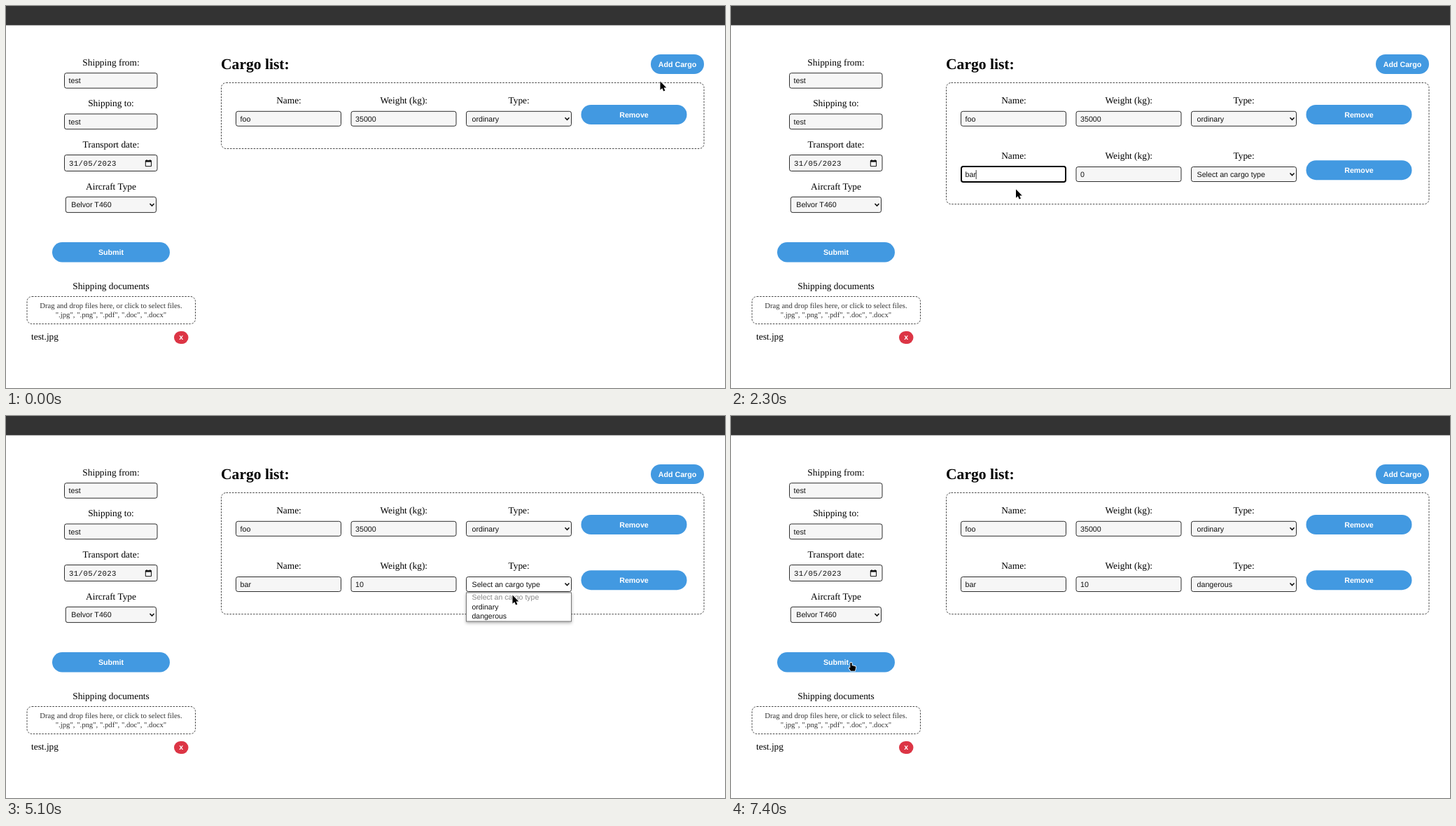
Recreate the animation shown at these times as an HTML page. Size 1027 px wide and 545 px high, loop 8000 ms.

```html
<!DOCTYPE html>
<html lang="en">
<head>
<meta charset="utf-8">
<title>Cargo form</title>
<style>
  html, body { margin: 0; width: 100%; height: 100%; overflow: hidden; background: #fff; }
  svg { display: block; width: 100%; height: 100%; }
  text {
    font: 10.69px "Liberation Sans", Arial, sans-serif; fill: #111;
    white-space: pre; text-rendering: geometricPrecision;
  }
  .label { font: 13.36px "Liberation Serif", Times, serif; fill: #000; text-anchor: middle; }
  .file { text-anchor: start; }
  .title { font: bold 21.6px "Liberation Serif", Times, serif; fill: #000; }
  .hint { font: 10.69px "Liberation Serif", Times, serif; fill: #333; text-anchor: middle; }
  .btn { font-weight: bold; fill: #fff; text-anchor: middle; }
  .date { font: 10.69px "Liberation Mono", monospace; letter-spacing: .35px; }
  .option { font-size: 10.5px; }
  .dashed { fill: none; stroke: #333; stroke-width: .9; stroke-dasharray: 2.5 1.7; }
</style>
</head>
<body>
<svg id="stage" viewBox="0 0 1027 545"></svg>
<script>
const LOOP = 8000, STEP = 100, ROW = 79.2;
const BLUE = '#4299e1', PICK = '#1e90ff';
const stage = document.getElementById('stage');

function add(parent, tag, attrs, content) {
  const node = document.createElementNS('http://www.w3.org/2000/svg', tag);
  for (const key in attrs) node.setAttribute(key, attrs[key]);
  if (content !== undefined) node.textContent = content;
  parent.appendChild(node);
  return node;
}
const set = (node, attrs) => { for (const key in attrs) node.setAttribute(key, attrs[key]); };
const show = (node, on) => node.setAttribute('display', on ? 'inline' : 'none');
const group = parent => add(parent, 'g', {});
const text = (parent, x, y, content, cls = '') => add(parent, 'text', { x, y, class: cls }, content);
const box = (parent, x, y, width, height, rx, attrs) =>
  add(parent, 'rect', { x, y, width, height, rx, ...attrs });

function button(parent, x, y, width, height, label) {
  box(parent, x, y, width, height, height / 2, { fill: BLUE });
  text(parent, x + width / 2, y + height / 2 + 3.8, label, 'btn');
}

function field(parent, x, y, width, height, value, pad = 6) {
  const frame = box(parent, x, y, width, height, 2.8, { fill: '#f6f6f6', stroke: '#222', 'stroke-width': 0.95 });
  return { frame, x, y, width, height, label: text(parent, x + pad, y + height / 2 + 3.9, value) };
}

function select(parent, x, y, width, height, value) {
  const made = field(parent, x, y, width, height, value, 8);
  add(parent, 'path', {
    d: `M${x + width - 9} ${y + height / 2 - 1.5}l3 3l3 -3`,
    fill: 'none', stroke: '#111', 'stroke-width': 1.6
  });
  return made;
}

function focus(item, on) {
  const inset = on ? 0.5 : 0;
  set(item.frame, {
    x: item.x + inset, width: item.width - 2 * inset,
    y: item.y - inset, height: item.height + 2 * inset,
    fill: on ? '#fff' : '#f6f6f6', stroke: on ? '#000' : '#222', 'stroke-width': on ? 2 : 0.95
  });
}

function cargoRow(parent, top, name, weight, type) {
  const heads = ['Name:', 'Weight (kg):', 'Type:'];
  heads.forEach((head, i) => text(parent, 404 + i * 164.3, top + 139, head, 'label'));
  button(parent, 821.5, top + 141, 151, 28, 'Remove');
  return {
    name: field(parent, 328.5, top + 150.3, 150, 21, name),
    weight: field(parent, 493, top + 150.3, 150, 21, weight),
    type: select(parent, 657.5, top + 150.3, 150, 21, type)
  };
}

// Left form
box(stage, 0, 0, 1027, 27.5, 0, { fill: '#333' });
[['Shipping from:', 85], ['Shipping to:', 143], ['Transport date:', 202],
 ['Aircraft Type', 261.5], ['Shipping documents', 403.5]]
  .forEach(([label, y]) => text(stage, 150, y, label, 'label'));
field(stage, 83.5, 95.7, 132.5, 21.5, 'test');
field(stage, 83.5, 154, 132.5, 21.7, 'test');
field(stage, 83.5, 212.5, 132.5, 23, '31/05/2023', 6.6).label.setAttribute('class', 'date');
add(stage, 'path', {
  d: 'M199.3 220.7h8.2v8h-8.2zM201 219v2M205.8 219v2',
  fill: 'none', stroke: '#111', 'stroke-width': 1
});
box(stage, 199, 220.2, 8.8, 2.4, 0, { fill: '#111' });
select(stage, 85.3, 272.4, 129.2, 22.2, 'Belvor T460');
button(stage, 66, 337, 168, 28.5, 'Submit');
box(stage, 30, 414.5, 240.5, 39, 7, { class: 'dashed' });
text(stage, 150, 431, 'Drag and drop files here, or click to select files.', 'hint');
text(stage, 150, 444, '".jpg", ".png", ".pdf", ".doc", ".docx"', 'hint');
text(stage, 36, 476, 'test.jpg', 'label file');
box(stage, 240, 464, 20.5, 18, 9, { fill: '#dc3545' });
text(stage, 250.2, 476.2, 'x', 'btn');

// Cargo list
text(stage, 307, 90, 'Cargo list:', 'title');
button(stage, 921, 69, 76, 28, 'Add Cargo');
const list = box(stage, 307.5, 109.5, 689.5, 94, 7, { class: 'dashed' });
cargoRow(stage, 0, 'foo', '35000', 'ordinary');
const second = group(stage);
const row = cargoRow(second, ROW, '', '0', '');
const marked = box(second, 498.8, 234, 6.2, 13, 0, { fill: PICK });
second.insertBefore(marked, row.weight.label);
const spinner = group(second);
box(spinner, 627.5, 233.5, 10, 13.5, 0, { fill: '#ececec' });
add(spinner, 'path', { d: 'M629.7 238.3l2.8 -3.2l2.8 3.2zM629.7 242.2l2.8 3.2l2.8 -3.2z', fill: '#444' });
const caret = box(second, 0, 234, 0.9, 13, 0, { fill: '#222' });

// Open option list
const popup = group(stage);
popup.style.filter = 'drop-shadow(0 2px 2px rgba(0,0,0,.3))';
box(popup, 657.5, 252, 150, 41, 0, { fill: '#fff', stroke: '#777' });
const highlight = box(popup, 658, 279, 149, 13.5, 0, { fill: PICK });
const options = ['Select an cargo type', 'ordinary', 'dangerous']
  .map((label, i) => text(popup, 665.5, 262.2 + i * 13.5, label, 'option'));

// Pointers, each with its hot spot near the origin
const pointer = group(stage);
const outline = {
  fill: '#000', stroke: '#fff', 'stroke-width': 1.6, 'stroke-linejoin': 'round', 'paint-order': 'stroke'
};
const shapes = {
  arrow: add(pointer, 'path', { d: 'M-.5 -.6V11.8L2.3 9.3L4.2 13.6L6.4 12.7L4.6 8.4H8.3Z', ...outline }),
  beam: group(pointer),
  hand: add(pointer, 'path', {
    d: 'M-1.2 .6Q0 -.8 1.2 .6V4L5.6 4.9Q7 5.2 6.8 6.8L5.6 11.8H-.4L-3.2 7.6Q-3 6.2 -1.2 7.2Z', ...outline
  })
};
const beamPath = 'M-2.5 -6Q0 -6 0 -4.6Q0 -6 2.5 -6M0 -4.6V4.8M-2.5 6.2Q0 6.2 0 4.8Q0 6.2 2.5 6.2';
[['#fff', 2.4], ['#222', 1.1]].forEach(([stroke, width]) =>
  add(shapes.beam, 'path', { d: beamPath, fill: 'none', stroke, 'stroke-width': width }));

// Pointer path: time, x, y
const path = [
  [0, 935, 108], [300, 942, 88], [500, 930, 92], [700, 640, 190], [900, 411, 244],
  [2200, 411, 244], [2400, 404, 280], [2700, 404, 280], [2900, 470, 312], [3100, 555, 262],
  [3200, 563, 238], [3400, 560, 240], [3600, 552, 241], [3800, 488.5, 252], [3900, 488.5, 252],
  [4000, 485, 244.5], [4200, 485, 244.5], [4300, 484, 245], [4400, 484, 245], [4600, 811, 276],
  [4700, 820, 262], [4900, 760, 240], [5100, 724, 256], [5300, 722, 309], [5400, 720, 305],
  [5500, 714, 291], [6000, 717, 282], [6400, 717, 282], [6600, 800, 361], [6800, 800, 361],
  [7000, 600, 372], [7200, 250, 362], [7400, 171.5, 352], [LOOP, 171.5, 352]
];

function pointerAt(t) {
  const i = path.findIndex(p => p[0] > t);
  const [t0, x0, y0] = path[i - 1], [t1, x1, y1] = path[i];
  const k = (t - t0) / (t1 - t0);
  return { x: x0 + (x1 - x0) * k, y: y0 + (y1 - y0) * k };
}

const within = (p, x, y, w, h) => p.x >= x && p.x <= x + w && p.y >= y && p.y <= y + h;
const between = (t, from, to) => t >= from && t < to;

function pointerKind(p, t, grown) {
  if (between(t, 3600, 4000)) return 'beam';
  const tops = grown ? [0, ROW] : [0];
  if (tops.some(top => [328, 492].some(x => within(p, x, top + 149, 152, 24)))) return 'beam';
  const onButton = within(p, 921, 69, 76, 28) || within(p, 66, 337, 168, 28) ||
    tops.some(top => within(p, 821, top + 141, 152, 28));
  return onButton ? 'hand' : 'arrow';
}

function typed(t, steps, start) {
  let value = start;
  for (const [at, next] of steps) if (t >= at) value = next;
  return value;
}

function draw(now) {
  const t = Math.floor((now % LOOP) / STEP) * STEP;
  const p = pointerAt(t);
  const grown = t >= 400;
  const open = between(t, 5000, 6300);
  const onName = between(t, 1000, 3400), onWeight = between(t, 3400, 5000);
  const name = typed(t, [[1800, 'b'], [1900, 'ba'], [2200, 'bar']], '');
  const weight = typed(t, [[4100, '1'], [4500, '10']], '0');
  const selected = between(t, 3800, 4100);

  list.setAttribute('height', grown ? 94 + ROW : 94);
  show(second, grown);
  row.name.label.textContent = name;
  row.weight.label.textContent = weight;
  row.type.label.textContent = t < 6300 ? 'Select an cargo type' : 'dangerous';
  focus(row.name, onName);
  focus(row.weight, onWeight);
  focus(row.type, between(t, 6300, 6700));
  if (open) row.type.frame.setAttribute('fill', '#fff');

  show(marked, selected);
  row.weight.label.style.fill = selected ? '#fff' : '';
  show(spinner, onWeight || within(p, 492, 228, 152, 24));

  const blinkedOff = between(t, 1600, 1800) || between(t, 2800, 3300);
  show(caret, (onName || onWeight) && !blinkedOff && !selected);
  const digit = 0.556 * 10.69;
  caret.setAttribute('x', onName
    ? 334.2 + Math.min(name.length, 2) * digit + (name.length > 2 ? 3.6 : 0)
    : 499 + weight.length * digit);

  show(popup, open);
  const hover = p.y >= 279 ? 2 : p.y >= 265 ? 1 : 0;
  show(highlight, open && hover > 0);
  highlight.setAttribute('y', 252 + hover * 13.5);
  options.forEach((option, i) => {
    option.style.fill = i === 0 ? '#888' : i === hover ? '#fff' : '#111';
  });

  const kind = pointerKind(p, t, grown);
  for (const key in shapes) show(shapes[key], key === kind);
  pointer.setAttribute('transform', `translate(${p.x} ${p.y})`);
}

const start = performance.now();
function tick() {
  draw(performance.now() - start);
  requestAnimationFrame(tick);
}
tick();
</script>
</body>
</html>
```
